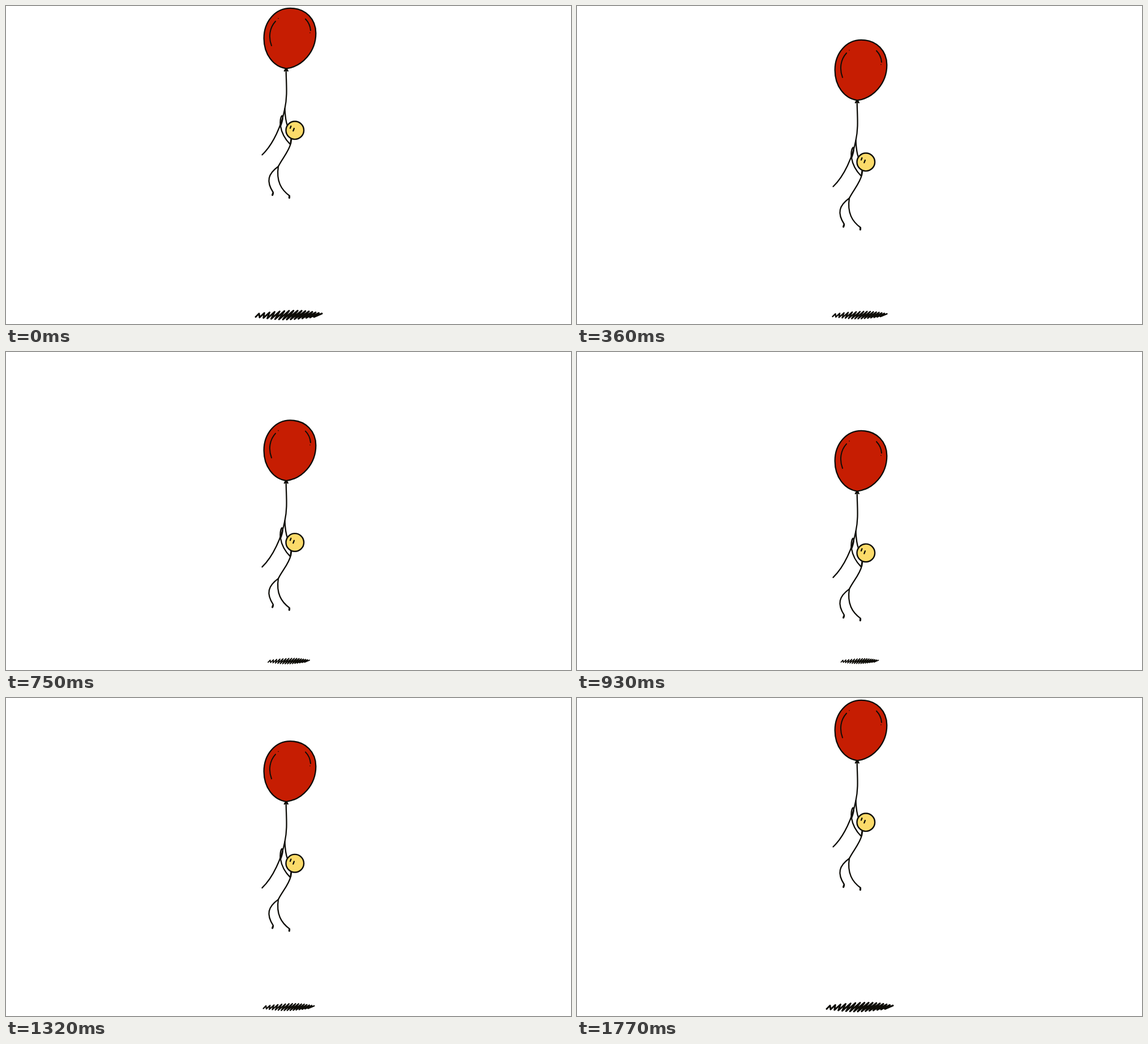
An HTML page for the animation above (1800 ms loop, 998 px wide and 561 px high).

```html
<!DOCTYPE html>
<html lang="en">
<head>
<meta charset="utf-8">
<title>Balloon ride</title>
<style>
  html, body { margin: 0; width: 100%; height: 100%; overflow: hidden; background: #fff; }
  svg { display: block; width: 998px; height: 561px; }
</style>
</head>
<body>
<svg viewBox="0 0 998 561" fill="none" stroke="#0e0d08" stroke-width="2.3" stroke-linecap="round" stroke-linejoin="round">
  <path id="shadow" stroke-width="3"/>
  <g id="rider">
    <!-- balloon -->
    <path fill="#c61d02" d="M495 110.4C472 107 455.6 85 455.6 57C455.6 27 476 3.8 502 3.8C530 3.8 547.3 24 547.3 48C547.3 81 523 107 495 110.4Z"/>
    <path stroke-width="2" d="M476 27C466 38 463 54 469 70M529 23Q537 31 538 43"/>
    <path stroke-width="1.6" d="M481 22h.01M537 47.3h.01"/>
    <path d="M494 111L491.8 114.6M496 111L497.8 114.6M492.5 114L495 112.5L497 114"/>
    <!-- string -->
    <path d="M494.7 114C495 138 497.5 158 492.5 181C487 210 472 244 452.5 262.5"/>
    <!-- arms and body -->
    <path d="M492.5 181C493 192 494 203 497 211"/>
    <path d="M485 212C483.5 204 485 196 487.5 193.5C490.5 195 488 204 485 212C487 225 494 236 502 244"/>
    <path stroke-width="3" d="M503.8 235L502.8 242"/>
    <path d="M503 242C500 256 488 269 481 283"/>
    <!-- legs -->
    <path d="M481 283C463 296 459 309 472 329M481 283C477 309 486 324 501 335"/>
    <path stroke-width="3.2" d="M471.6 330.5L470.6 333.5M500.6 336L500.4 338.5"/>
    <!-- head -->
    <circle cx="510.3" cy="219.3" r="15.8" fill="#fcdb6a" stroke-width="2.4"/>
    <path d="M503.4 212L502 215.6M508.9 216L507.3 220.4"/>
  </g>
</svg>
<script>
const LOOP = 1800, STEP = 30, LOW_TIME = 900, LAST = LOOP - STEP;
const DROP = 140, SHRINK = 0.45;
const rider = document.getElementById('rider');
const shadow = document.getElementById('shadow');

// Scribbled shadow: slanted strokes, longest in the middle
function scribble(strokes) {
  const points = [];
  for (let i = 0; i < strokes; i++) {
    const along = i / (strokes - 1);
    const swell = Math.sin(Math.PI * along);
    const x = 441 + 103 * along;
    const lean = 6 + 8 * along + 9 * swell;
    points.push([x, 548.5 + 4.5 * swell]);
    points.push([x + lean, 542.5 - 5 * swell]);
  }
  return 'M' + points.map(p => p.map(n => n.toFixed(1)).join(' ')).join('L');
}

function render(time) {
  const t = Math.floor(time % LOOP / STEP) * STEP;
  const low = t < LOW_TIME ? t / LOW_TIME : (LAST - t) / (LAST - LOW_TIME);
  const scale = 1 - SHRINK * low;
  rider.setAttribute('transform', `translate(0 ${DROP * low})`);
  shadow.setAttribute('transform', `translate(499.5 545.3) scale(${scale}) translate(-499.5 -545.3)`);
}

shadow.setAttribute('d', scribble(16));
const start = performance.now();
function tick() {
  render(performance.now() - start);
  requestAnimationFrame(tick);
}
tick();
</script>
</body>
</html>
```
